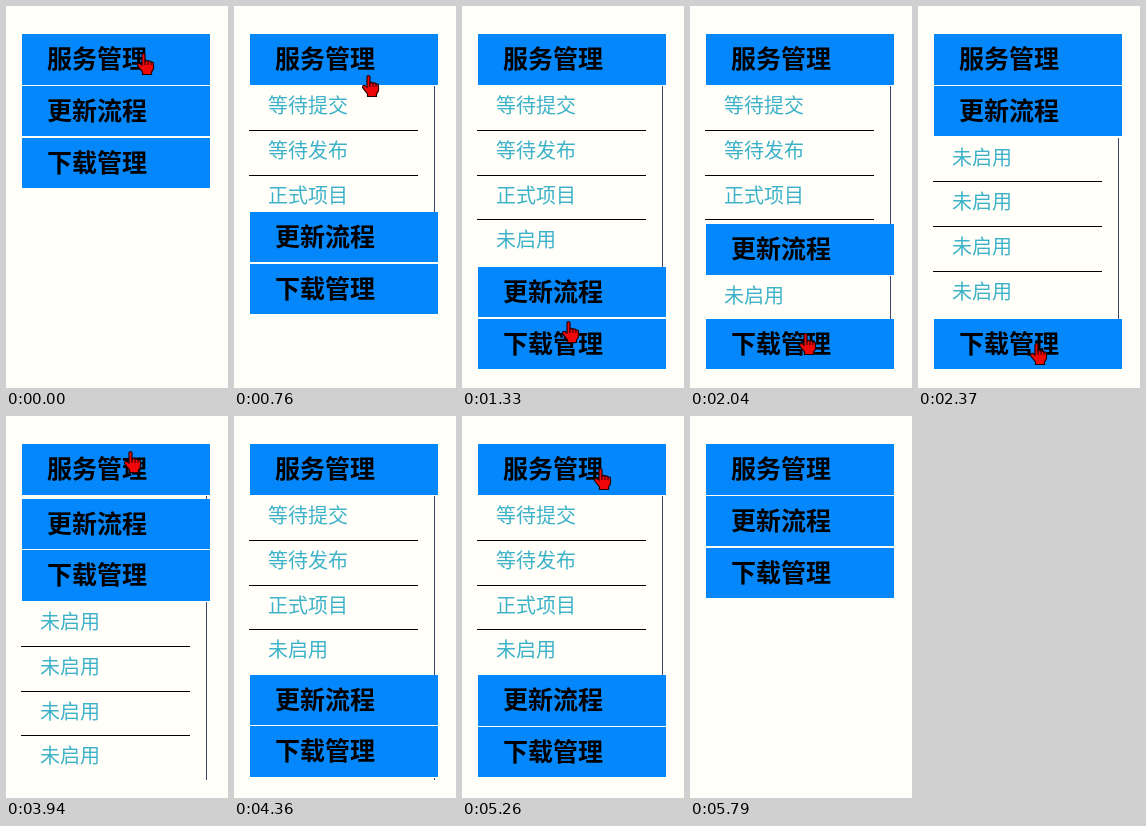
Animation, 222 px wide and 382 px high, one loop 6.06 s. Source, as an HTML page:

```html
<!DOCTYPE html>
<html lang="zh-CN">
<head>
<meta charset="utf-8">
<title>折叠菜单</title>
<style>
  html, body { margin: 0; width: 100%; height: 100%; overflow: hidden; background: #fffef9; }
  body { position: relative; font-family: "Noto Sans CJK SC", "Noto Sans CJK", sans-serif; white-space: nowrap; }
  nav { position: absolute; left: 15px; top: 28.45px; width: 189px; }
  .head {
    height: 50.4px; margin: 0 0 1.2px 1px; padding-left: 25px;
    background: #0487fa; color: #000; font-size: 25px; font-weight: 700; line-height: 46px;
  }
  .panel { width: 185px; overflow: hidden; border-right: 1px solid #3c4470; }
  .item {
    width: 150px; height: 43.75px; padding-left: 19px;
    color: #3db2c8; font-size: 20px; font-weight: 300; line-height: 37px;
    border-bottom: 1px solid #000;
  }
  .item:last-child { border: 0; }
  .item.hot { color: #d8321c; }
  #hand { position: absolute; left: -8px; top: 0; overflow: visible; }
</style>
</head>
<body>
<nav></nav>
<svg id="hand" width="18" height="23" viewBox="-8 0 18 23">
  <path d="M-2 12V2Q-2 .5 -.5 .5T1 2V8Q2.5 6.5 4 8.2Q5.7 7.2 6.8 9Q9.5 8.5 9.5 11V15Q9.5 17 7.5 19V21.5H-1.5V19L-6.5 12.5Q-6.5 10 -4 10.5Z"
    fill="#f00808" stroke="#200" stroke-width="1.2"/>
  <path d="M1 8V12M4 8.5V12M7 9.5V12" stroke="#200" fill="none"/>
</svg>
<script>
const LOOP = 6060, SLIDE = 495, PANEL = 181, ROW = 44.75, HOVER_LAG = 30, HAND_GONE = 5790;
const menu = {
  '服务管理': ['等待提交', '等待发布', '正式项目', '未启用'],
  '更新流程': Array(4).fill('未启用'),
  '下载管理': Array(4).fill('未启用')
};
const clicks = [
  { at: 450, opens: 0 },
  { at: 1881, opens: 1 },
  { at: 2945, opens: 2 },
  { at: 3901, opens: 0 },
  { at: 5230, opens: null }
];
// The hand rests between moves.
const home = { x: 138, y: 47 };
const moves = [
  { from: 710, to: 1400, x: 104, y: 345 },
  { from: 1400, to: 1750, x: 85, y: 293 },
  { from: 1881, to: 2100, x: 128, y: 340 },
  { from: 2100, to: 2920, x: 102, y: 330 },
  { from: 2920, to: 3600, x: 125, y: 34 },
  { from: 3940, to: 4250, x: 235, y: 365 },
  { from: 4550, to: 5150, x: 139, y: 52 }
];

const nav = document.querySelector('nav');
const hand = document.getElementById('hand');

function add(parent, className, text = '') {
  const el = document.createElement('div');
  el.className = className;
  el.textContent = text;
  return parent.appendChild(el);
}

const panels = Object.entries(menu).map(([title, labels]) => {
  add(nav, 'head', title);
  const panel = add(nav, 'panel');
  labels.forEach(label => add(panel, 'item', label));
  return panel;
});

const progress = (t, from, duration) => Math.min(1, Math.max(0, (t - from) / duration));
const swing = p => 0.5 - Math.cos(Math.PI * p) / 2;

function pointer(t) {
  return moves.reduce(({ x, y }, move) => {
    const p = progress(t, move.from, move.to - move.from);
    return { x: x + (move.x - x) * p, y: y + (move.y - y) * p };
  }, home);
}

// Each click slides its own section open and whatever was open shut.
function openness(t, section) {
  return clicks.reduce((open, { at, opens }) =>
    open + ((opens === section) - open) * swing(progress(t, at, SLIDE)), 0);
}

function draw(t) {
  panels.forEach((panel, i) => panel.style.height = PANEL * openness(t, i) + 'px');

  const hover = pointer(t - HOVER_LAG);
  panels.forEach(panel => {
    const box = panel.getBoundingClientRect();
    const inside = hover.x < box.right && hover.y >= box.top && hover.y < box.bottom;
    const row = Math.floor((hover.y - box.top) / ROW);
    [...panel.children].forEach((item, k) => item.classList.toggle('hot', inside && k === row));
  });

  const { x, y } = pointer(t);
  hand.style.transform = `translate(${Math.round(x)}px, ${Math.round(y)}px)`;
  hand.style.display = t < HAND_GONE ? 'block' : 'none';
}

function tick() {
  draw(performance.now() % LOOP);
  requestAnimationFrame(tick);
}
tick();
</script>
</body>
</html>
```
